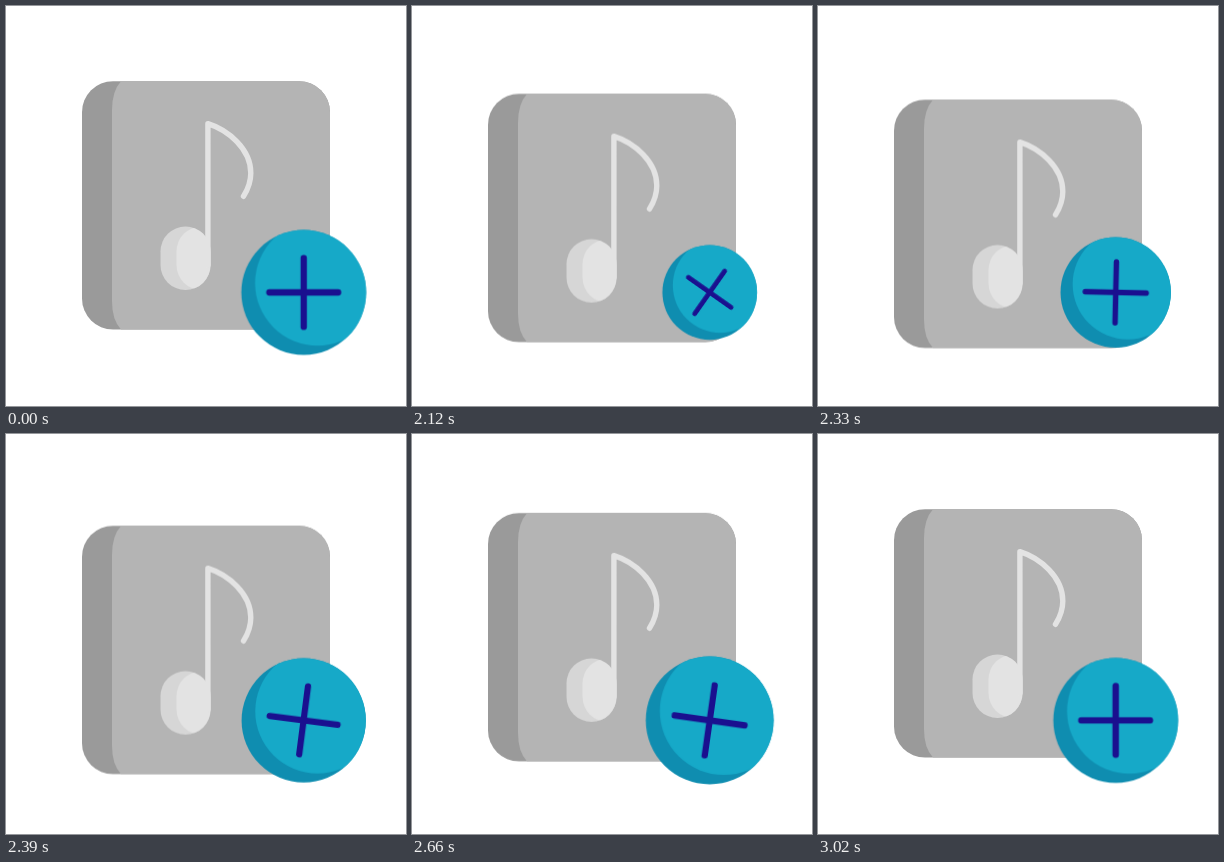
An HTML page for the animation above (3.05 s loop, 400x400 px).

```html
<!DOCTYPE html>
<html lang="en">
<head>
<meta charset="utf-8">
<title>Add music</title>
<style>
  html, body { margin: 0; width: 100%; height: 100%; overflow: hidden; background: #fff; }
  svg { display: block; width: 100%; height: 100%; }

  .card, .badge, .plus {
    --smooth: cubic-bezier(.333, 0, .667, 1);
    transform-origin: 0 0;
    animation: 3050ms infinite;
  }
  .card  { animation-name: dip; }
  .badge { animation-name: pulse; }
  .plus  { animation-name: turn; }

  /* The press starts 2000 ms into the loop. */
  @keyframes dip {
    0%            { transform: translateY(0); }
    65.574%       { transform: translateY(0); animation-timing-function: var(--smooth); }
    75.738%       { transform: translateY(18.8px); animation-timing-function: ease; }
    99.016%, 100% { transform: translateY(0); }
  }
  @keyframes pulse {
    0%            { transform: scale(1); }
    65.574%       { transform: scale(1); animation-timing-function: var(--smooth); }
    72.459%       { transform: scale(.722); animation-timing-function: cubic-bezier(.33, 0, .45, 1); }
    82.623%       { transform: scale(1.082); animation-timing-function: ease; }
    93.77%, 100%  { transform: scale(1); }
  }
  @keyframes turn {
    0%            { transform: rotate(0deg); }
    65.574%       { transform: rotate(0deg); animation-timing-function: var(--smooth); }
    83.607%       { transform: rotate(103deg); animation-timing-function: ease; }
    99.016%, 100% { transform: rotate(90deg); }
  }
</style>
</head>
<body>
<svg viewBox="0 0 400 400">
  <defs>
    <clipPath id="head"><rect x="154.5" y="220.5" width="50" height="63.5" rx="25"/></clipPath>
    <clipPath id="disc"><circle r="62.4"/></clipPath>
  </defs>

  <g class="card">
    <rect x="76" y="75.2" width="248" height="248.3" rx="31" fill="#9a9a9a"/>
    <path fill="#b4b4b4" d="M115 75.2H293A31 31 0 0 1 324 106.2V292.5A31 31 0 0 1 293 323.5H115Q106 314 106 295V104Q106 85 115 75.2Z"/>
    <g clip-path="url(#head)">
      <rect x="154" y="220" width="51" height="65" fill="#d6d6d6"/>
      <rect x="170.5" y="220.5" width="50" height="63.5" rx="25" fill="#e3e3e3"/>
    </g>
    <path d="M201.9 259V117.7C222 124 244.8 143 244.8 167C244.8 176 241.5 184 237.5 190.3"
      fill="none" stroke="#e3e3e3" stroke-width="5.4" stroke-linecap="round" stroke-linejoin="round"/>
  </g>

  <g transform="translate(297.7 286.4)">
    <g class="badge">
      <circle r="62.4" fill="#0f8db0"/>
      <circle cx="13.8" cy="-9.3" r="62.5" fill="#16a9c8" clip-path="url(#disc)"/>
      <path class="plus" d="M-34.4 0H34.4M0 -34.4V34.4" stroke="#1a108f" stroke-width="6.3" stroke-linecap="round"/>
    </g>
  </g>
</svg>
</body>
</html>
```
